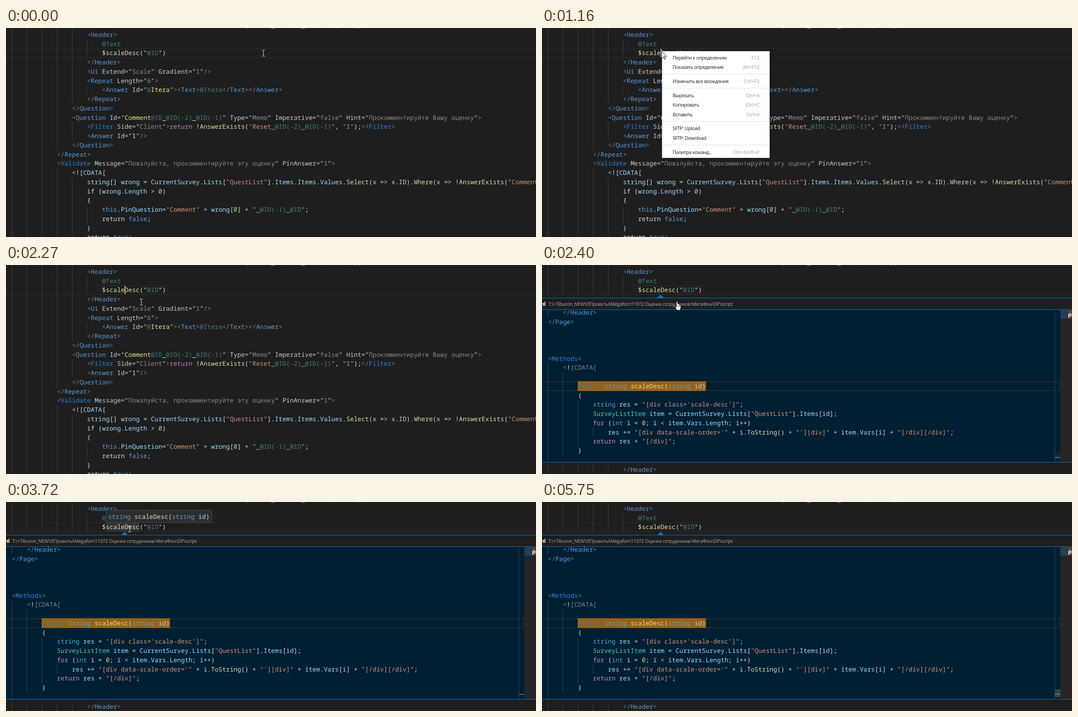
These frames come from a looping animation (1189 px wide and 471 px high, 6 s). An HTML page with a canvas:

```html
<!DOCTYPE html>
<html lang="ru">
<head>
<meta charset="utf-8">
<title>Peek definition</title>
<style>
html, body { margin: 0; width: 100%; height: 100%; overflow: hidden; background: #1e1e1e; }
canvas { display: block; }
</style>
</head>
<body>
<canvas id="stage" width="1189" height="471"></canvas>
<script>
const ctx = document.getElementById('stage').getContext('2d', { alpha: false });
const WIDTH = 1189, HEIGHT = 471, LOOP = 6000;
const LEFT = 13.2, CHAR = 8.43, ROW = 20.75;
const MONO = '500 14.05px "Noto Sans Mono", monospace';
const UI = '11px "Open Sans", sans-serif';
const BG = '#1e1e1e', BLUE = '#007acc';

const COLORS = {
  g: '#808080', b: '#569cd6', B: '#1f7fe6', a: '#c8c8c8', v: '#8a8a8a',
  t: '#3f7878', y: '#ece87c', f: '#dcdcaa', w: '#d4d4d4', l: '#9cdcfe',
  o: '#ce9178', n: '#b5cea8', p: '#c586c0', c: '#4ec9b0', d: '#3a76a8', k: '#4aa3dc'
};

// A line is [indent, runs]; runs are split by "~" and start with a colour key.
const MAIN = [
  [20, 'g<~bHeader~g>'],
  [24, 't@Text'],
  [24, 'f$scaleDesc~w("~t@ID~w")'],
  [20, 'g</~bHeader~g>'],
  [20, 'g<~bUi~a Extend="~vScale~a" Gradient="~v1~a"~g/>'],
  [20, 'g<~bRepeat~a Length="~v6~a"~g>'],
  [24, 'g<~bAnswer~a Id="~t@~yItera~a"~g><~bText~g>~t@Itera~g</~bText~g></~bAnswer~g>'],
  [20, 'g</~bRepeat~g>'],
  [16, 'g</~bQuestion~g>'],
  [16, 'g<~bQuestion~a Id="~yComment~t@ID~y_~t@ID(-2)~y_~t@ID(-1)~a" Type="~vMemo~a" Imperative="~vfalse~a" Hint="~vПрокомментируйте Вашу оценку~a"~g>'],
  [20, 'g<~BFilter~a Side="~vClient~a"~g>~preturn~w !~fAnswerExists~w(~o"Reset_~t@ID(-2)~o_~t@ID(-1)~o"~w, ~o"1"~w);~g</~BFilter~g>'],
  [20, 'g<~bAnswer~a Id="~y1~a"~g/>'],
  [16, 'g</~bQuestion~g>'],
  [12, 'g</~bRepeat~g>'],
  [12, 'g<~BValidate~a Message="~vПожалуйста, прокомментируйте эту оценку~a" PinAnswer="~v1~a"~g>'],
  [16, 'w<![~lCDATA~w['],
  [20, 'lstring~w[] ~lwrong~w = ~lCurrentSurvey~w.~lLists~w[~o"QuestList"~w].~lItems~w.~lItems~w.~lValues~w.~fSelect~w(~lx~w => ~lx~w.~lID~w).~fWhere~w(~lx~w => !~fAnswerExists~w(~o"Comment_'],
  [20, 'wif (~lwrong~w.~lLength~w > ~n0~w)'],
  [20, 'w{'],
  [24, 'bthis~w.~lPinQuestion~w=~o"Comment"~w + ~lwrong~w[~n0~w] + ~o"_~t@ID(-1)~o_~t@ID~o"~w;'],
  [24, 'wreturn ~bfalse~w;'],
  [20, 'w}'],
  [20, 'wreturn ~btrue~w;']
];
const ABOVE = [62, 'w(~o"Reset_~t@ID(-2)~o_~t@ID(-1)~o"~w, ~o"1"~w));'];

const PEEK = [
  [4, 'g</~bHeader~g>'],
  [0, 'g</~bPage~g>'],
  [0, ''], [0, ''], [0, ''],
  [0, 'g<~BMethods~g>'],
  [4, 'g<~w!~g[CDATA['],
  [8, ''],
  [8, 'dpublic ~kstring~f scaleDesc~w(~kstring~l id~w)'],
  [8, 'w{'],
  [12, 'kstring~l res~w = ~o"[div class=\'scale-desc\']"~w;'],
  [12, 'cSurveyListItem~l item~w = ~lCurrentSurvey~w.~lLists~w[~o"QuestList"~w].~lItems~w[~lid~w];'],
  [12, 'pfor~w (~kint~l i~w = ~n0~w; ~li~w < ~litem~w.~lVars~w.~lLength~w; ~li~w++)'],
  [16, 'lres~w += ~o"[div data-scale-order=\'"~w + ~li~w.~fToString~w() + ~o"\'][div]"~w + ~litem~w.~lVars~w[~li~w] + ~o"[/div][/div]"~w;'],
  [12, 'preturn~l res~w + ~o"[/div]"~w;'],
  [8, 'w}'],
  [4, '']
];

// [centre y, label, shortcut]; an entry with only y is a separator.
const MENU = [
  [67, 'Перейти к определению', 'F12'],
  [88, 'Показать определение', 'Alt+F12'],
  [103],
  [119.5, 'Изменить все вхождения', 'Ctrl+F2'],
  [135],
  [151.5, 'Вырезать', 'Ctrl+X'],
  [173, 'Копировать', 'Ctrl+C'],
  [194.5, 'Вставить', 'Ctrl+V'],
  [210],
  [226, 'SFTP: Upload', ''],
  [248, 'SFTP: Download', ''],
  [263],
  [279.5, 'Палитра команд...', 'Ctrl+Shift+P']
];

// [start time, pointer shape, x, y]
const POINTER = [
  [0, 'beam', 577, 56], [460, 'beam', 552, 68], [620, 'beam', 389, 69],
  [770, 'beam', 300, 63], [890, 'beam', 272, 53], [1040, 'arrow', 268, 52],
  [1590, 'arrow', 283, 63], [1710, 'arrow', 299, 76], [1860, 'arrow', 302, 82],
  [2270, 'beam', 303, 83], [2400, 'hand', 305, 92], [2830, 'hand', 297, 90],
  [2960, 'hand', 291, 87], [3110, 'beam', 284, 69], [3270, 'beam', 278, 61],
  [3570, 'beam', 277, 60], [5220, 'beam', 400, 125], [5350, 'beam', 640, 240],
  [5480, 'beam', 900, 375], [5610, 'beam', 1041, 449], [5750, 'none', 0, 0]
];

function rect(x, y, w, h, color) {
  ctx.fillStyle = color;
  ctx.fillRect(x, y, w, h);
}

function text(str, x, y, font, color, align = 'left', spacing = 0) {
  ctx.font = font;
  ctx.letterSpacing = spacing + 'px';
  ctx.textRendering = 'geometricPrecision';
  ctx.textAlign = align;
  ctx.fillStyle = color;
  ctx.fillText(str, x, y);
}

function code(runs, x, y) {
  for (const run of runs.split('~')) {
    text(run.slice(1), x, y, MONO, COLORS[run[0]]);
    x += (run.length - 1) * CHAR;
  }
}

function codeLine([indent, runs], top, guide) {
  for (let col = 0; col < indent; col += 4) {
    rect(Math.floor(LEFT + col * CHAR), Math.round(top), 1, Math.round(top + ROW) - Math.round(top), guide);
  }
  if (runs) code(runs, LEFT + indent * CHAR, Math.round(top + 15.1));
}

function clipTo(x, y, w, h, draw) {
  ctx.save();
  ctx.beginPath();
  ctx.rect(x, y, w, h);
  ctx.clip();
  draw();
  ctx.restore();
}

function drawEditor(count, wordLit) {
  const rowTop = i => 4.85 + ROW * i;
  for (let col = 0; col < 20; col += 4) rect(Math.floor(LEFT + col * CHAR), 0, 1, 5, '#404040');
  code(ABOVE[1], LEFT + ABOVE[0] * CHAR, -1);
  rect(0, 46, WIDTH, 1, '#2d2d2d');
  rect(0, 66, WIDTH, 1, '#2d2d2d');
  if (wordLit) rect(224, 47, 75, 19, '#303335');
  MAIN.slice(0, count).forEach((line, i) => codeLine(line, rowTop(i), '#404040'));
}

function drawMenu(hover) {
  ctx.save();
  ctx.shadowColor = 'rgba(0,0,0,.5)';
  ctx.shadowBlur = 4;
  ctx.shadowOffsetX = 2;
  rect(269, 52, 242, 241, '#c4c4c4');
  ctx.restore();
  rect(270, 53, 240, 239, '#ffffff');
  MENU.forEach(([y, label, keys], i) => {
    if (!label) return rect(270, y, 239, 1, '#e2e2e2');
    const lit = i === hover;
    if (lit) rect(270, y - 11, 240, 22, '#e8e8e8');
    text(label, 293, y + 4, UI, '#1e1e1e', 'left', -0.48);
    text(keys, 488, y + 4, '10.8px "Open Sans", sans-serif', lit ? '#1e1e1e' : '#9b9b9b', 'right');
  });
}

function drawPeek(slider) {
  rect(0, 67, WIDTH, HEIGHT - 67, BG);
  polygon([[266, 67], [274, 75], [258, 75]], BLUE);
  rect(0, 74, WIDTH, 1, BLUE);
  text('ml', 8, 92, 'bold 12px "Open Sans", sans-serif', '#ffffff', 'right', -0.3);
  text('T:\\=Tiburon_NEW\\!!!Проекты\\Megafon\\11972 Оценка сотрудников МегаФон\\DP\\script',
    14, 92, UI, '#a6a6a6', 'left', -0.48);

  rect(0, 101, 1163, 344, '#001f33');
  rect(0, 262, 1163, 22, '#282828');
  rect(0, 264, 1161, 18, '#001f33');
  rect(80, 262, 288, 22, '#996214');
  clipTo(0, 101, 1163, 343, () => {
    PEEK.forEach((line, i) => codeLine(line, 96.8 + ROW * i, '#3b454b'));
  });
  rect(1150, 104, 1, 340, '#36434d');
  if (slider) rect(1151, 422, 12, 18, `rgba(121,121,121,${slider})`);
  rect(1151, 433, 12, 1, '#a0a0a0');

  rect(1163, 101, 26, 344, '#252526');
  rect(1163, 102, 26, 19, '#263d54');
  rect(1181, 103, 8, 17, '#5e4637');
  text('public', 1180, 116, 'bold 12px "Open Sans", sans-serif', '#f0f0f0');
  rect(0, 100, WIDTH, 1, BLUE);
  rect(0, 444, WIDTH, 1, BLUE);
  rect(0, 445, WIDTH, 1, BG);
  codeLine(MAIN[3], 451, '#404040');
}

function drawTip() {
  rect(224, 18, 238, 29, '#4b4b4d');
  rect(225, 19, 236, 27, '#2d2d30');
  code('kstring~f scaleDesc~w(~kstring~l id~w)', 229, 38);
}

function polygon(points, fill, stroke) {
  ctx.beginPath();
  points.forEach(([x, y]) => ctx.lineTo(x, y));
  ctx.closePath();
  ctx.fillStyle = fill;
  ctx.fill();
  if (!stroke) return;
  ctx.strokeStyle = stroke;
  ctx.lineWidth = 1;
  ctx.stroke();
}

const pointers = {
  none() {},
  beam() {
    rect(0, -6, 1, 13, '#e4e4e4');
    for (const y of [-7, 7]) {
      rect(-3, y, 3, 1, '#e4e4e4');
      rect(1, y, 3, 1, '#e4e4e4');
    }
  },
  arrow() {
    polygon([[.5, .5], [.5, 16.5], [4.2, 13], [6.8, 18.5], [9, 17.5], [6.6, 12], [11.5, 12]], '#fff', '#000');
  },
  hand() {
    polygon([[-3.5, -9], [-2, -10], [-.5, -9], [-.5, -4], [1.5, -4.5], [3, -3], [5, -3],
      [6.5, -1], [6.5, 4], [4.5, 10], [-2.5, 10], [-6.5, 3], [-6, 1], [-3.5, 3]], '#fff', '#000');
    for (const x of [0, 2.5, 4.5]) rect(x - .5, -2, 1, 4, '#555');
  }
};

function drawPointer(t) {
  const [, shape, x, y] = POINTER.findLast(step => step[0] <= t);
  ctx.save();
  ctx.translate(x, y);
  pointers[shape]();
  ctx.restore();
}

function render(t) {
  const within = (from, to) => t >= from && t < to;
  const peek = t >= 2400;
  rect(0, 0, WIDTH, HEIGHT, BG);
  drawEditor(peek ? 3 : MAIN.length, within(3570, 5220));
  if (within(1040, 2400)) rect(266, 47, 2, 19, '#aeafad');
  if (within(1160, 2270)) drawMenu(t < 1590 ? -1 : t < 1860 ? 0 : 1);
  if (peek) drawPeek(t < 2550 ? 0.1 : t >= 5220 ? 0.4 : 0);
  if (within(3720, 5220)) drawTip();
  drawPointer(t);
}

const start = performance.now();
function tick() {
  render((performance.now() - start) % LOOP);
  requestAnimationFrame(tick);
}
tick();
</script>
</body>
</html>
```
